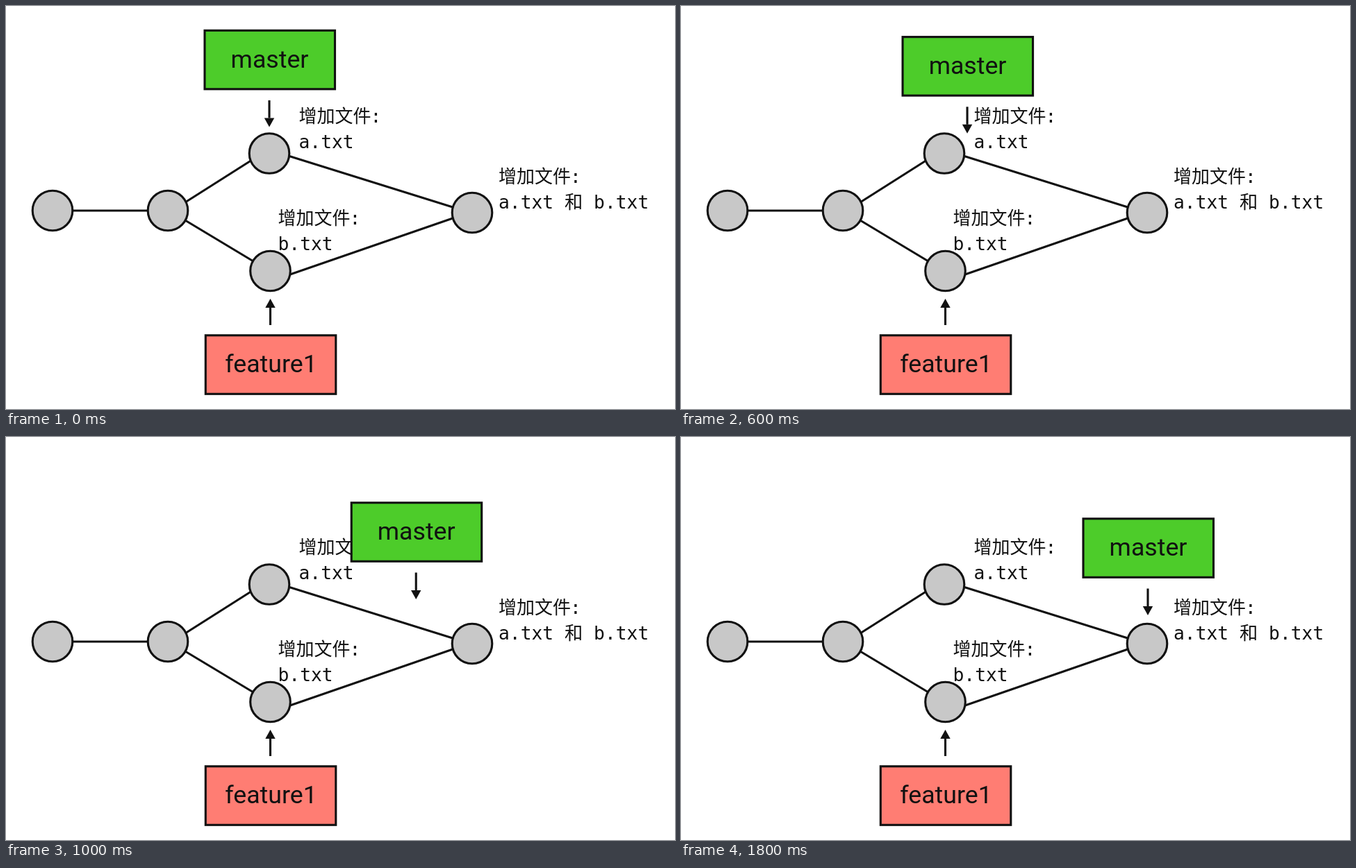
Write an HTML page with a canvas that moves like this. It is 963 by 581 pixels and loops after 2000 ms.

```html
<!DOCTYPE html>
<html lang="zh">
<head>
<meta charset="utf-8">
<title>Branch merge</title>
<style>
  html, body { margin: 0; width: 100%; height: 100%; overflow: hidden; background: #fff; }
  canvas { display: block; }
</style>
</head>
<body>
<canvas id="stage" width="963" height="581"></canvas>
<script>
const ctx = document.getElementById('stage').getContext('2d');
const LOOP = 2000, STEP = 200;
const MOVE = { start: 366, length: 1000, dx: 293, dy: 82.5 };
const INK = '#111';
const LABEL_FONT = '35.7px Roboto, sans-serif';
const NOTE_FONT = '26.3px "DejaVu Sans Mono", "Noto Sans CJK SC", "Noto Sans CJK", monospace';
const HAN_FONT = '500 26px "Noto Sans CJK SC", "Noto Sans CJK", sans-serif';

const clamp = v => Math.min(1, Math.max(0, v));

// Cubic ease-in-out with control points (0.42, 0) and (0.58, 1).
function easeInOut(u) {
  let low = 0, high = 1;
  for (let i = 0; i < 30; i++) {
    const s = (low + high) / 2, r = 1 - s;
    const x = 3 * r * r * s * 0.42 + 3 * r * s * s * 0.58 + s ** 3;
    if (x < u) low = s; else high = s;
  }
  return low * low * (3 - 2 * low);
}

function line(x1, y1, x2, y2) {
  ctx.beginPath();
  ctx.moveTo(x1, y1);
  ctx.lineTo(x2, y2);
  ctx.stroke();
}

function commit(x, y) {
  ctx.beginPath();
  ctx.arc(x, y, 28.8, 0, Math.PI * 2);
  ctx.fillStyle = '#c8c8c8';
  ctx.fill();
  ctx.stroke();
}

function arrow(x, tail, tip) {
  const base = tip - Math.sign(tip - tail) * 13;
  line(x, tail, x, base);
  ctx.beginPath();
  ctx.moveTo(x, tip);
  ctx.lineTo(x - 7.2, base);
  ctx.lineTo(x + 7.2, base);
  ctx.fillStyle = INK;
  ctx.fill();
}

function text(str, x, y, font, align = 'left') {
  ctx.font = font;
  ctx.textAlign = align;
  ctx.fillStyle = INK;
  ctx.fillText(str, x, y);
}

function branch(name, x, y, color, textX, baseline) {
  ctx.fillStyle = color;
  ctx.fillRect(x, y, 187.5, 84.5);
  ctx.strokeRect(x, y, 187.5, 84.5);
  text(name, textX, baseline, LABEL_FONT, 'center');
}

function note(x, y, files) {
  text('增加文件', x, y, HAN_FONT);
  text(':', x + 103, y, NOTE_FONT);
  text(files, x, y + 37.5, NOTE_FONT);
}

function draw(time) {
  ctx.fillStyle = '#fff';
  ctx.fillRect(0, 0, 963, 581);
  ctx.strokeStyle = INK;
  ctx.lineWidth = 3.1;

  line(96, 295, 204, 295);
  line(258, 283, 354, 222);
  line(258, 309, 356, 368);
  line(408, 216.5, 643, 290);
  line(409, 387, 643, 306);
  commit(67, 295);
  commit(233, 295);
  commit(379, 212.5);
  commit(380.5, 382);
  commit(671, 298);

  note(421.5, 167.5, 'a.txt');
  note(391.5, 314.5, 'b.txt');
  note(709, 254.5, 'a.txt 和 b.txt');

  branch('feature1', 287.3, 474.8, '#ff7d73', 381.5, 528);
  arrow(380.5, 460, 422);

  const k = easeInOut(clamp((time - MOVE.start) / MOVE.length));
  ctx.save();
  ctx.translate(MOVE.dx * k, MOVE.dy * k);
  branch('master', 286, 35.3, '#4dcc2a', 379.5, 88.5);
  arrow(379, 136, 174.5);
  ctx.restore();
}

function tick() {
  const time = performance.now() % LOOP;
  draw(Math.floor(time / STEP) * STEP);
  requestAnimationFrame(tick);
}
tick();
</script>
</body>
</html>
```
